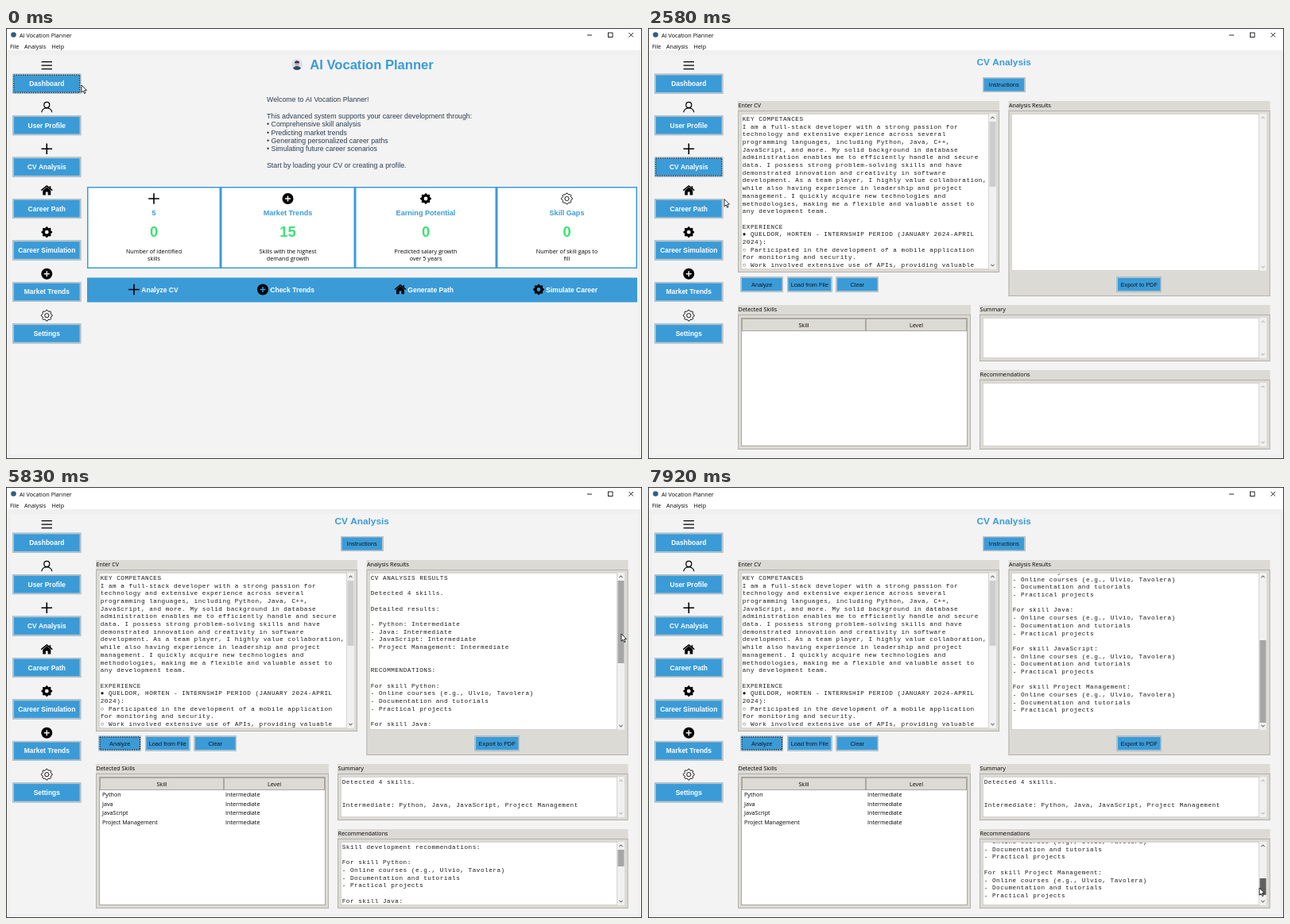
Animation of 800 by 543 pixels, one loop 8000 ms. Source, as an HTML page with a canvas:

```html
<!DOCTYPE html>
<html lang="en">
<head>
<meta charset="utf-8">
<title>AI Vocation Planner</title>
<style>
html, body { margin: 0; width: 100%; height: 100%; overflow: hidden; background: #f0f0f0; }
canvas { display: block; }
</style>
</head>
<body>
<canvas id="stage" width="800" height="543"></canvas>
<script>
const ctx = document.getElementById('stage').getContext('2d');
const LOOP = 8000;
const BLUE = '#3b9bd7', GREEN = '#3ae374', SLATE = '#2c3e50', PANEL = '#f3f3f3', CLAM = '#dcdad5', EDGE = '#aaa8a3';
const ARIAL = '"Liberation Sans", Arial, sans-serif';
const UI = '"Open Sans", "Noto Sans", sans-serif';
const MONO = '"Liberation Mono", "Courier New", monospace';
const PITCH = 9.69;

// Pointer path: time, x, y
const PATH = [
  [80, 95, 72], [330, 70, 74], [500, 70, 74], [830, 69, 125], [1400, 69, 125], [1900, 69, 170],
  [2420, 69, 170], [2800, 139, 288], [3420, 139, 288], [3750, 143, 322], [4080, 143, 322],
  [4420, 517, 360], [4580, 517, 360], [5250, 759, 216], [5330, 759, 216], [5830, 774, 185],
  [6080, 774, 185], [6420, 774, 249], [6600, 774, 260], [6900, 774, 260], [7500, 769, 469],
  [7640, 769, 469], [7920, 769, 505]
];
const FOCUS = [[0, 'Dashboard'], [1000, 'User Profile'], [2080, 'CV Analysis'], [3750, 'Analyze'], [4000, ''], [4580, 'Analyze']];
const TEXT_AREAS = [[117, 108, 312, 196], [457, 108, 312, 198], [421, 365, 348, 51], [421, 447, 348, 80]];
const SIDEBAR = [['Dashboard', 'menu'], ['User Profile', 'user'], ['CV Analysis', 'plus'], ['Career Path', 'home'],
  ['Career Simulation', 'gear'], ['Market Trends', 'add'], ['Settings', 'cog']];

const CV_TEXT = `KEY COMPETANCES
I am a full-stack developer with a strong passion for
technology and extensive experience across several
programming languages, including Python, Java, C++,
JavaScript, and more. My solid background in database
administration enables me to efficiently handle and secure
data. I possess strong problem-solving skills and have
demonstrated innovation and creativity in software
development. As a team player, I highly value collaboration,
while also having experience in leadership and project
management. I quickly acquire new technologies and
methodologies, making me a flexible and valuable asset to
any development team.

EXPERIENCE
● QUELDOR, HORTEN - INTERNSHIP PERIOD (JANUARY 2024-APRIL
2024):
○ Participated in the development of a mobile application
for monitoring and security.
○ Work involved extensive use of APIs, providing valuable`;
const SKILLS = ['Python', 'Java', 'JavaScript', 'Project Management'];
const ADVICE = SKILLS.map(s => `For skill ${s}:
- Online courses (e.g., Ulvio, Tavolera)
- Documentation and tutorials
- Practical projects`).join('\n\n');
const RESULTS = `CV ANALYSIS RESULTS\n\nDetected 4 skills.\n\nDetailed results:\n\n${
  SKILLS.map(s => `- ${s}: Intermediate`).join('\n')}\n\n\nRECOMMENDATIONS:\n\n${ADVICE}`;
const SUMMARY = `Detected 4 skills.\n\n\nIntermediate: ${SKILLS.join(', ')}`;
const RECOMMENDATIONS = `Skill development recommendations:\n\n${ADVICE}`;

let pointer, focus;

const inside = ([x, y], [l, t, w, h]) => x >= l && x < l + w && y >= t && y < t + h;

function box(x, y, w, h, fill, stroke, weight = 1) {
  ctx.fillStyle = fill;
  ctx.fillRect(x, y, w, h);
  if (!stroke) return;
  ctx.strokeStyle = stroke;
  ctx.lineWidth = weight;
  ctx.strokeRect(x + weight / 2, y + weight / 2, w - weight, h - weight);
}

// y is the middle of the capitals
function text(str, x, y, size, family = UI, color = '#000', align = 'left', weight = 400) {
  ctx.font = `${weight} ${size}px ${family}`;
  ctx.textAlign = align;
  ctx.fillStyle = color;
  ctx.fillText(str, x, y + size * .36);
}
const bold = (str, x, y, size, color, align = 'center') => text(str, x, y, size, ARIAL, color, align, 700);

function lines(...points) {
  ctx.beginPath();
  for (const [x1, y1, x2, y2] of points) { ctx.moveTo(x1, y1); ctx.lineTo(x2, y2); }
  ctx.stroke();
}

function polygon(points, close = true) {
  ctx.beginPath();
  points.forEach(([x, y]) => ctx.lineTo(x, y));
  if (close) ctx.closePath();
}

function gearPath(hole) {
  polygon(Array.from({ length: 32 }, (_, i) => {
    const r = (i & 3) < 2 ? 6.9 : 5.6, a = (i - .5) * Math.PI / 16;
    return [r * Math.cos(a), r * Math.sin(a)];
  }));
  ctx.moveTo(hole, 0);
  ctx.arc(0, 0, hole, 0, 7);
}

const ICONS = {
  menu() { lines([-6.7, -4.5, 6.7, -4.5], [-6.7, 0, 6.7, 0], [-6.7, 4.5, 6.7, 4.5]); },
  user() {
    ctx.beginPath();
    ctx.arc(0, -2.8, 3.5, 0, 7);
    ctx.moveTo(-6.5, 6.5);
    ctx.bezierCurveTo(-6, -.5, 6, -.5, 6.5, 6.5);
    ctx.stroke();
  },
  plus() { ctx.lineWidth = 1.6; lines([-6.8, 0, 6.8, 0], [0, -6.8, 0, 6.8]); },
  home() {
    polygon([[-5, 0], [0, -4.4], [5, 0], [5, 5.8], [1.4, 5.8], [1.4, 1.8], [-1.4, 1.8], [-1.4, 5.8], [-5, 5.8]]);
    ctx.fill();
    ctx.fillRect(3.2, -5.4, 1.8, 4);
    ctx.lineWidth = 1.5;
    polygon([[-7, 0], [0, -5.8], [7, 0]], false);
    ctx.stroke();
  },
  gear() { gearPath(2.4); ctx.fill('evenodd'); },
  add(bg) {
    ctx.beginPath();
    ctx.arc(0, 0, 7, 0, 7);
    ctx.fill();
    ctx.strokeStyle = bg;
    ctx.lineWidth = 1.5;
    lines([-3.5, 0, 3.5, 0], [0, -3.5, 0, 3.5]);
  },
  cog() { ctx.lineWidth = .9; gearPath(2.6); ctx.stroke(); }
};
function icon(name, x, y, bg = PANEL) {
  ctx.save();
  ctx.translate(x, y);
  ctx.fillStyle = ctx.strokeStyle = '#000';
  ctx.lineWidth = 1.2;
  ICONS[name](bg);
  ctx.restore();
}

function button(label, x, y, w, h = 19, main = false) {
  box(x, y, w, h, inside(pointer, [x, y, w, h]) ? GREEN : BLUE, '#bcc3c7', main ? 1.7 : 1.5);
  if (focus === label) {
    ctx.strokeStyle = '#000';
    ctx.lineWidth = 1;
    ctx.setLineDash([1.4, 1.4]);
    ctx.strokeRect(x + 1.5, y + 1.5, w - 3, h - 3);
    ctx.setLineDash([]);
  }
  if (main) bold(label, x + w / 2, y + h / 2, 8.45, '#fff');
  else text(label, x + w / 2, y + h / 2, 7.4, ARIAL, '#101820', 'center');
}

function group(title, x, y, w, h) {
  box(x, y, w, 12, CLAM);
  box(x, y + 12, w, h - 12, CLAM, EDGE, .8);
  text(title, x + .5, y + 5.5, 7.2);
}

const field = (x, y, w) => box(x, y - 6.5, w, 13, '#fff', '#9c9a96');
const label = (str, x, y) => text(str, x, y, 7.4, ARIAL, SLATE);

// Small letters set wide, like a typewriter face
function textArea([x, y, w, h], content, scroll = 0) {
  box(x, y, w, h, '#fff', '#c6c4c0', .7);
  ctx.save();
  ctx.beginPath();
  ctx.rect(x, y + 1, w, h - 2);
  ctx.clip();
  ctx.letterSpacing = '0.51px';
  content.split('\n').forEach((line, i) => text(line, x + 1.7, y + 6.2 + i * PITCH - scroll, 7.7, MONO, '#1a1a1a'));
  ctx.restore();
}

function scrollbar(x, y, h, thumb, size, color) {
  box(x, y, 9, h, '#f0f0f0');
  if (size) box(x + .5, thumb, 8, size, color);
  ctx.strokeStyle = size ? '#404040' : '#a8a8a8';
  ctx.lineWidth = 1;
  for (const [cy, d] of [[y + 5, -1.2], [y + h - 5, 1.2]]) {
    polygon([[x + 2.5, cy - d], [x + 4.5, cy + d], [x + 6.5, cy - d]], false);
    ctx.stroke();
  }
}

function drawWindow() {
  box(0, 0, 800, 543, '#f0f0f0');
  box(0, 0, 800, 28, '#fff');
  box(6, 34, 789, 504, PANEL);
  ctx.fillStyle = '#2d5f86';
  ctx.beginPath();
  ctx.arc(9.5, 8.5, 3.3, 0, 7);
  ctx.fill();
  text('AI Vocation Planner', 17, 9, 7.25);
  text('File', 5, 23.5, 7.2);
  text('Analysis', 23, 23.5, 7.2);
  text('Help', 57.5, 23.5, 7.2);
  ctx.strokeStyle = '#111';
  ctx.lineWidth = .9;
  lines([731, 9, 737, 9], [783.5, 6, 789, 11.5], [789, 6, 783.5, 11.5]);
  ctx.strokeRect(757.5, 6, 5.5, 5.5);
  SIDEBAR.forEach(([name, glyph], i) => {
    icon(glyph, 51.3, 47.2 + i * 52.5);
    button(name, 8.3, 57.7 + i * 52.45, 86, 25, true);
  });
}

function drawAvatar(x, y) {
  ctx.save();
  ctx.beginPath();
  ctx.arc(x, y, 7, 0, 7);
  ctx.fillStyle = '#cfe3f3';
  ctx.fill();
  ctx.clip();
  ctx.fillStyle = '#34495e';
  ctx.beginPath();
  ctx.ellipse(x, y + 7, 5.5, 5, 0, 0, 7);
  ctx.fill();
  ctx.fillStyle = '#d9a98c';
  ctx.beginPath();
  ctx.arc(x, y - 1, 2.8, 0, 7);
  ctx.fill();
  ctx.fillStyle = '#3b3036';
  ctx.beginPath();
  ctx.arc(x, y - 1.8, 3, Math.PI, 0);
  ctx.fill();
  ctx.restore();
}

function drawDashboard() {
  drawAvatar(366, 46);
  bold('AI Vocation Planner', 460, 46, 16.6, BLUE);
  ['Welcome to AI Vocation Planner!', '', 'This advanced system supports your career development through:',
    '• Comprehensive skill analysis', '• Predicting market trends', '• Generating personalized career paths',
    '• Simulating future career scenarios', '', 'Start by loading your CV or creating a profile.'
  ].forEach((line, i) => text(line, 328, 90.3 + i * 10.27, 8.8, ARIAL, SLATE));
  [
    [102, 168, 'plus', '5', '0', 'Number of identified', 'skills'],
    [270, 169, 'add', 'Market Trends', '15', 'Skills with the highest', 'demand growth'],
    [439, 178, 'gear', 'Earning Potential', '0', 'Predicted salary growth', 'over 5 years'],
    [617, 177, 'cog', 'Skill Gaps', '0', 'Number of skill gaps to', 'fill']
  ].forEach(([x, w, glyph, title, value, ...note]) => {
    const mid = x + w / 2;
    box(x, 200, w, 103, '#fff', BLUE, 1.5);
    icon(glyph, mid, 215, '#fff');
    bold(title, mid, 233, 9.1, BLUE);
    bold(value, mid, 256, 18.4, GREEN);
    note.forEach((line, i) => text(line, mid, 281 + i * 9.8, 7.2, UI, '#000', 'center'));
  });
  box(102, 314.5, 692, 31, BLUE);
  [[161, 'plus', 'Analyze CV'], [323, 'add', 'Check Trends'], [496, 'home', 'Generate Path'], [670, 'gear', 'Simulate Career']]
    .forEach(([x, glyph, title]) => {
      icon(glyph, x, 329.5, BLUE);
      bold(title, x + 9.3, 329.7, 8.5, '#fff', 'left');
    });
}

function drawHeading(title) {
  bold(title, 447.7, 42.6, 11.8, BLUE);
  button('Instructions', 421, 62, 53.5);
}

function drawProfile() {
  drawHeading('User Profile');
  [['Personal Data', 92, 82], ['Work Experience', 185.5, 64], ['Education', 261, 44], ['Skills', 317, 161]]
    .forEach(([title, y, h]) => {
      group(title, 113, y, 669.5, h);
      box(120, y + 18.5, 656, h - 25.5, PANEL);
    });
  [['First Name:', 127, 120, 178.5], ['Last Name:', 314, 120, 365], ['Email:', 127, 139, 178.5],
    ['Phone:', 314, 139, 365], ['Location:', 127, 158, 178.5], ['Current Role:', 127, 214, 183], ['Industry:', 127, 233, 183]
  ].forEach(([name, x, y, fx]) => { label(name, x, y); field(fx, y, 123.5); });
  text('ivor', 181, 120.5, 7.2);

  label('Experience (years):', 319, 214);
  field(396, 214, 35);
  text('0', 398.5, 214, 7.2);
  box(423.5, 208.5, 6.5, 11, CLAM, EDGE, .7);
  label('Education:', 127, 289);
  field(175, 289, 131.5);
  box(298, 283, 8, 12, CLAM, EDGE, .7);
  ctx.fillStyle = '#000';
  for (const [x, y, s, d] of [[426.7, 211.5, 1.6, -1], [426.7, 216.5, 1.6, 1], [302, 289, 2.6, 1.4]]) {
    polygon([[x - s, y - d], [x + s, y - d], [x, y + d]]);
    ctx.fill();
  }

  label('Skills List:', 127, 344);
  textArea([174.5, 338, 208.5, 51], 'Python, Java, JavaScript, Project\nManagement');
  scrollbar(383, 338, 51);
  label('New Skill:', 186, 403.5);
  field(132, 426, 83);
  button('Add', 221, 417.5, 53);
  button('Remove Selected', 169.5, 444, 67);
  button('Save Profile', 356.5, 495, 53.5);
  button('Analyze CV', 421, 495, 53.5);
  button('Clear Form', 485.5, 495, 53.5);
}

function drawAnalysis(t) {
  const done = t >= 4000;
  const resultDrag = t < 6080 ? 0 : Math.min(75, pointer[1] - 185);
  const adviceDrag = t < 7640 ? 0 : pointer[1] - 469;
  const thumbColor = held => held ? '#606060' : '#a6a6a6';
  const [cv, results, summary, advice] = TEXT_AREAS;
  drawHeading('CV Analysis');

  group('Enter CV', 113, 92, 329, 216);
  textArea(cv, CV_TEXT);
  scrollbar(429, 108, 196, 118, 82, '#cdcdcd');
  button('Analyze', 116.5, 313.5, 53.5);
  button('Load from File', 175, 313.5, 56.5);
  button('Clear', 236.5, 313.5, 53.5);

  group('Analysis Results', 453.5, 92, 329, 246);
  textArea(results, done ? RESULTS : '', resultDrag * 1.915);
  scrollbar(769, 108, 198, 118 + resultDrag, done ? 104 : 0, thumbColor(t >= 6000 && t < 6830));
  button('Export to PDF', 589.5, 313.5, 56.5);

  group('Detected Skills', 113, 349, 293, 182);
  box(117, 365, 285, 162, '#fff', EDGE);
  for (const [x, w, title] of [[118, 156, 'Skill'], [274, 127, 'Level']]) {
    box(x, 366, w, 16, CLAM, '#9e9a91', .8);
    text(title, x + w / 2, 374.3, 7.2, UI, '#000', 'center');
  }
  if (done) SKILLS.forEach((skill, i) => {
    text(skill, 121, 387.7 + i * 11.45, 7.2);
    text('Intermediate', 276, 387.7 + i * 11.45, 7.2);
  });

  group('Summary', 417, 349, 365.5, 71);
  textArea(summary, done ? SUMMARY : '');
  scrollbar(769, 365, 51);

  group('Recommendations', 417, 431, 365.5, 100);
  textArea(advice, done ? RECOMMENDATIONS : '', adviceDrag * 3.69);
  scrollbar(769, 447, 80, 457 + adviceDrag, done ? 21 : 0, thumbColor(t >= 7560));
}

function pointerAt(t) {
  const next = PATH.findIndex(p => p[0] > t);
  if (next < 1) return (next ? PATH[PATH.length - 1] : PATH[0]).slice(1);
  const [t0, x0, y0] = PATH[next - 1], [t1, x1, y1] = PATH[next];
  const u = (t - t0) / (t1 - t0), k = u * u * (3 - 2 * u);
  return [x0 + (x1 - x0) * k, y0 + (y1 - y0) * k];
}

function drawPointer(typing) {
  ctx.save();
  ctx.translate(...pointer);
  ctx.strokeStyle = '#000';
  ctx.lineWidth = .8;
  if (typing) {
    lines([-2, -5, 2, -5], [0, -5, 0, 5], [-2, 5, 2, 5]);
  } else {
    polygon([[0, 0], [0, 9.2], [2.1, 7.3], [3.6, 10.6], [5, 10], [3.6, 6.7], [6.4, 6.5]]);
    ctx.fillStyle = '#fff';
    ctx.fill();
    ctx.stroke();
  }
  ctx.restore();
}

function draw(t) {
  pointer = pointerAt(t);
  focus = FOCUS.filter(f => f[0] <= t).pop()[1];
  const analysis = t >= 2170;
  drawWindow();
  if (analysis) drawAnalysis(t);
  else if (t >= 1080) drawProfile();
  else drawDashboard();
  drawPointer(analysis && t < 6000 && TEXT_AREAS.some(area => inside(pointer, area)));
  ctx.strokeStyle = '#3c3c3c';
  ctx.lineWidth = 1;
  ctx.strokeRect(.5, .5, 799, 542);
}

function tick() {
  draw(performance.now() % LOOP);
  requestAnimationFrame(tick);
}
tick();
</script>
</body>
</html>
```
